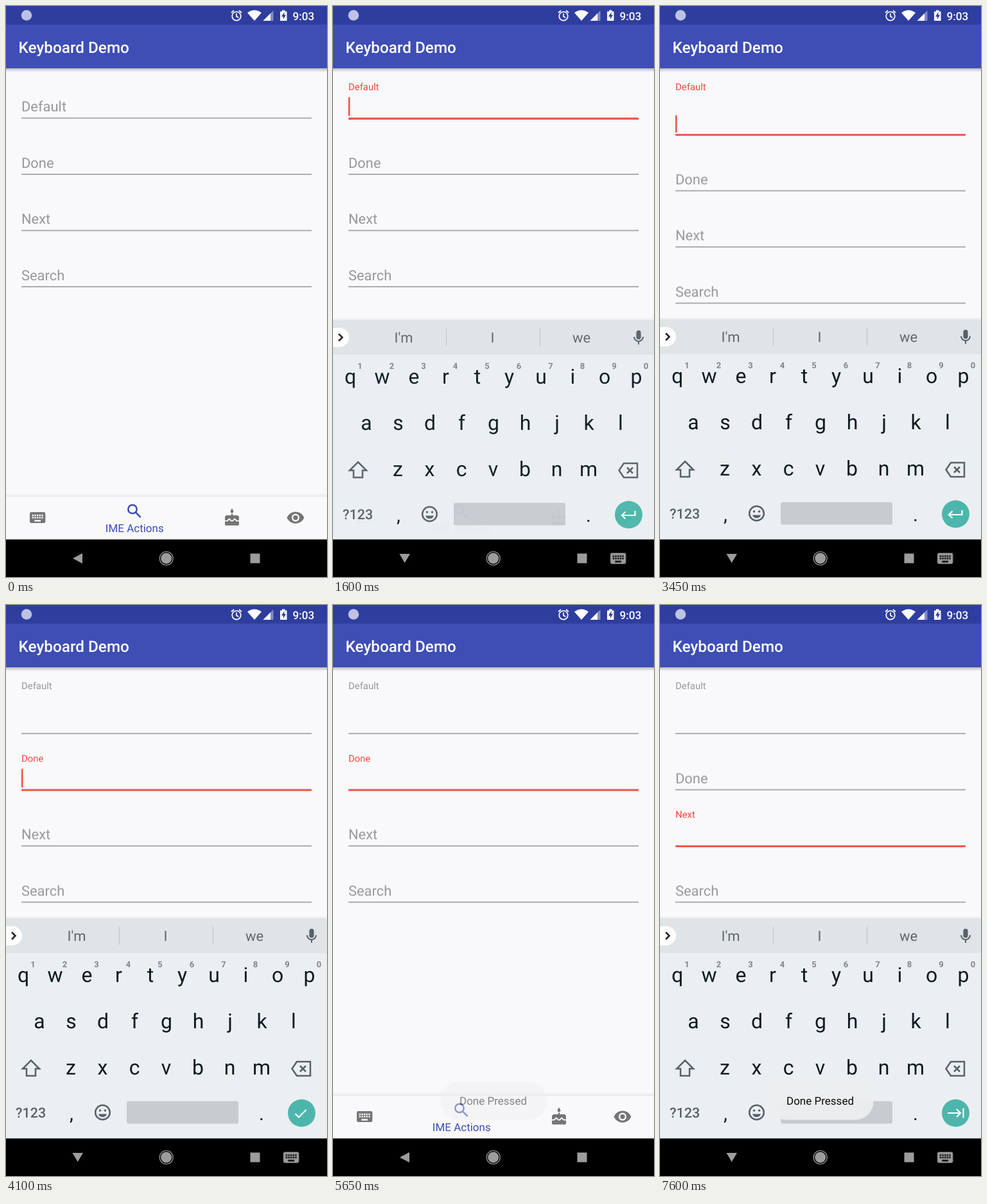
An HTML page for the animation above (8000 ms loop, 500x889 px).

```html
<!DOCTYPE html>
<html lang="en">
<head>
<meta charset="utf-8">
<title>Keyboard Demo</title>
<style>
:root { --bg: #f9f8fa; --grey: #999799; --red: #f2483f; --blue: #3d4db5; --ink: #566269; }
html, body { margin: 0; width: 100%; height: 100%; overflow: hidden; background: var(--bg); }
svg { display: block; width: 100vw; height: 100vh; font-family: Roboto, sans-serif; text-rendering: geometricPrecision; }
.mid { text-anchor: middle; }
.line { fill: none; stroke: var(--ink); stroke-width: 2.5; }
.white { stroke: #fff; stroke-width: 2.2; }

.step { animation: 8s step-end infinite; }
.ease { animation: 8s cubic-bezier(.4,0,.2,1) infinite; }
.label { font-size: 21.9px; fill: var(--grey); transform: translateY(-10.2px); }

/* 1% = 80 ms */
@keyframes grow { 0% { transform: none } 30.625% { transform: translateY(25.6px) } 100% { transform: translateY(25.6px) } }

@keyframes label0 {
  0%, 17.5% { transform: translateY(-10.2px) scale(1); fill: var(--grey) }
  20%, 48.125% { transform: translateY(-43.6px) scale(.68); fill: var(--red) }
  50.625%, 100% { transform: translateY(-43.6px) scale(.68); fill: var(--grey) }
}
@keyframes label1 {
  0%, 48.125% { transform: translateY(-10.2px) scale(1); fill: var(--grey) }
  50.625%, 88.75% { transform: translateY(-43.6px) scale(.68); fill: var(--red) }
  91.25%, 100% { transform: translateY(-10.2px) scale(1); fill: var(--grey) }
}
@keyframes label2 {
  0%, 88.75% { transform: translateY(-10.2px) scale(1); fill: var(--grey) }
  91.25%, 100% { transform: translateY(-43.6px) scale(.68); fill: var(--red) }
}

@keyframes focus0 { 0%, 48.125%, 100% { opacity: 0 } 17.5% { opacity: 1 } }
@keyframes focus1 { 0%, 88.75%, 100% { opacity: 0 } 48.125% { opacity: 1 } }
@keyframes focus2 { 0% { opacity: 0 } 88.75%, 100% { opacity: 1 } }

@keyframes caret0 { 0%, 23.75%, 30.625%, 100% { opacity: 0 } 17.5%, 30% { opacity: 1 } }
@keyframes caretB { 0%, 36.875%, 48.125%, 100% { opacity: 0 } 30.625%, 43.125% { opacity: 1 } }
@keyframes caret1 {
  0%, 54.375%, 66.875%, 80%, 88.75%, 100% { opacity: 0 }
  48.125%, 60.625%, 73.125%, 86.25% { opacity: 1 }
}
@keyframes caret2 { 0%, 95%, 100% { opacity: 0 } 88.75% { opacity: 1 } }

.board { animation: board 8s infinite; }
@keyframes board {
  0%, 17.5% { opacity: 0; transform: translateY(34px); animation-timing-function: cubic-bezier(.17,.84,.44,1) }
  21.25% { opacity: 1; transform: none }
  68.125% { opacity: 1; transform: none; animation-timing-function: cubic-bezier(.4,0,1,1) }
  70.5%, 88.75% { opacity: 0; transform: translateY(34px); animation-timing-function: cubic-bezier(.17,.84,.44,1) }
  92.5%, 100% { opacity: 1; transform: none }
}
@keyframes open { 0%, 69.375%, 100% { opacity: 0 } 18.125%, 89.375% { opacity: 1 } }
@keyframes shut { 0%, 69.375%, 100% { opacity: 1 } 18.125%, 89.375% { opacity: 0 } }

@keyframes enter { 0% { opacity: 1 } 48.125%, 100% { opacity: 0 } }
@keyframes check { 0%, 88.75%, 100% { opacity: 0 } 48.125% { opacity: 1 } }
@keyframes next { 0% { opacity: 0 } 88.75%, 100% { opacity: 1 } }

.press { animation: press 8s linear infinite; }
@keyframes press {
  0%, 29.37% { opacity: 0 }
  29.375%, 30.625% { opacity: 1 }
  32.5%, 66.87% { opacity: 0 }
  66.875%, 70% { opacity: 1 }
  71%, 100% { opacity: 0 }
}

@keyframes tap {
  0%, 17.5%, 30.625%, 48.75%, 68.125%, 89.375%, 100% { opacity: 0 }
  16.25% { opacity: 1; transform: translate(300px, 160px) }
  29.375% { opacity: 1; transform: translate(474px, 795px) }
  47.5% { opacity: 1; transform: translate(300px, 268px) }
  66.875% { opacity: 1; transform: translate(479px, 795px) }
  88.125% { opacity: 1; transform: translate(300px, 356px) }
}

.toast { animation: toast 8s infinite; }
@keyframes toast {
  0%, 69% { opacity: 0; animation-timing-function: cubic-bezier(.25,.46,.45,.94) }
  75%, 100% { opacity: 1 }
}
</style>
</head>
<body>
<svg viewBox="0 0 500 889" preserveAspectRatio="none">
  <defs>
    <linearGradient id="drop" x2="0" y2="1">
      <stop stop-color="#000" stop-opacity=".24"/><stop offset="1" stop-color="#000" stop-opacity="0"/>
    </linearGradient>
    <linearGradient id="rise" y1="1" x2="0" y2="0">
      <stop stop-color="#000" stop-opacity=".07"/><stop offset="1" stop-color="#000" stop-opacity="0"/>
    </linearGradient>
    <g id="keys">
      <rect x="2" y="5" width="20" height="14" rx="2"/>
      <path d="M5 9H19M5 12H19" stroke="var(--gap)" stroke-width="2" stroke-dasharray="2 1"/>
      <path d="M8 16H16" stroke="var(--gap)" stroke-width="2"/>
    </g>
  </defs>
  <rect width="500" height="889" fill="var(--bg)"/>

  <g id="form"><g id="flow" class="step" style="animation-name:grow"></g></g>

  <!-- tabs -->
  <rect y="759" width="500" height="5" fill="url(#rise)"/>
  <rect y="764" width="500" height="67" fill="var(--bg)"/>
  <g fill="#757575" style="--gap:var(--bg)">
    <use href="#keys" transform="translate(34.6 782) scale(1.2165)"/>
    <g transform="translate(337.4 782) scale(1.2165)">
      <path d="M12 0L13.7 3A2 2 0 1 1 10.3 3ZM3 12a3 3 0 0 1 3-3h5V7h2v2h5a3 3 0 0 1 3 3v9a1 1 0 0 1-1 1H4a1 1 0 0 1-1-1Z"/>
      <path d="M2 16.2H5q1 0 1.8-.8l1.7-1.8 2.3 2.2q1.2.9 2.4 0l2.3-2.2 1.7 1.8q.8.8 1.8.8h3" fill="none" stroke="var(--bg)" stroke-width="1.5"/>
    </g>
    <g transform="translate(436.4 782) scale(1.2165)">
      <path d="M1 12C2.7 7.6 7 4.5 12 4.5S21.3 7.6 23 12C21.3 16.4 17 19.5 12 19.5S2.700 16.4 1 12Z"/>
      <circle cx="12" cy="12" r="4" fill="none" stroke="var(--bg)" stroke-width="2"/>
    </g>
  </g>
  <g fill="none" stroke="var(--blue)" stroke-width="2.5">
    <circle cx="197" cy="783.4" r="6.7"/><path d="M201.800 788.200L209.600 796"/>
  </g>
  <text class="mid" x="200.300" y="819" font-size="17" fill="var(--blue)">IME Actions</text>

  <!-- soft keyboard -->
  <g class="board">
    <rect y="484" width="500" height="5" fill="url(#rise)"/>
    <rect y="488" width="500" height="380" fill="#eceff1"/>
    <rect y="488" width="500" height="54" fill="#e1e4e6"/>
    <path d="M0 500H10a15 15 0 0 1 0 30H0Z" fill="#fdfdfd"/>
    <path class="line" d="M9 509.500l5.500 5.500-5.500 5.500" style="stroke:#222"/>
    <path d="M176.500 501v28M322.500 501v28" stroke="#c3c7ca" stroke-width="1.200"/>
    <g class="mid" font-size="22" fill="#5d686e">
      <text x="110" y="523">I'm</text><text x="248.500" y="523">I</text><text x="387" y="523">we</text>
    </g>
    <rect x="472.400" y="504" width="7.200" height="14" rx="3.600" fill="var(--ink)"/>
    <path class="line" d="M469 514a7 7 0 0 0 14 0M476 521v5" style="stroke-width:2"/>
    <g id="letters" class="mid" fill="#0d1a20"></g>
    <text x="15" y="798" font-size="21.500" font-weight="500" fill="var(--ink)">?123</text>
    <path class="line" d="M39 709L52 722H46V733H32V722H26ZM453 711H474V733H453L445.500 722ZM458 717.500l9 9m0-9l-9 9"/>
    <circle class="line" cx="150.500" cy="790" r="11.300"/>
    <g fill="var(--ink)"><circle cx="146.500" cy="787" r="1.800"/><circle cx="154.500" cy="787" r="1.800"/>
      <path d="M144 792.500h13a6.800 6.800 0 0 1-13 0Z"/></g>
    <rect x="188" y="772.500" width="174" height="35" rx="3" fill="#c8ccd0"/>
    <circle cx="460.500" cy="791" r="21.500" fill="#4db6ac"/>
    <circle class="press" cx="460.500" cy="791" r="22" fill="#05a095"/>
    <path class="line white step" style="animation-name:enter" d="M470.500 785v7H450m5.500-5.500l-5.500 5.500 5.500 5.500"/>
    <path class="line white step" style="animation-name:check" d="M450.500 792l5.500 5.500 11.500-11.500"/>
    <path class="line white step" style="animation-name:next" d="M448 791h20m-6-6l6 6-6 6M472.500 783.500v15"/>
  </g>

  <!-- system bar -->
  <rect y="830.500" width="500" height="59" fill="#000"/>
  <g fill="#9c9c9c" style="--gap:#000">
    <path class="step" style="animation-name:shut" d="M104 860L119 852V868Z"/>
    <path class="step" style="animation-name:open" d="M103.500 853H120L111.700 867Z"/>
    <circle cx="249.700" cy="860" r="8.500"/>
    <circle cx="249.700" cy="860" r="10.500" fill="none" stroke="#9c9c9c" stroke-width="1.200"/>
    <rect x="380.500" y="852.500" width="15" height="15"/>
    <g class="step" style="animation-name:open"><use href="#keys" transform="translate(429.500 845.500) scale(1.2165)"/></g>
  </g>

  <g class="toast">
    <rect x="167.500" y="742" width="165" height="59.500" rx="28" fill="#eeeeef" fill-opacity=".95"/>
    <text class="mid" x="249.500" y="778" font-size="17" fill="#0c0c0c">Done Pressed</text>
  </g>

  <!-- top bars -->
  <rect y="97" width="500" height="6" fill="url(#drop)"/>
  <rect width="500" height="97" fill="#3f4eb5"/>
  <rect width="500" height="29" fill="#2f3e9e"/>
  <text x="19.500" y="73" font-size="24.300" font-weight="500" fill="#fff">Keyboard Demo</text>
  <circle cx="32" cy="14.500" r="8.300" fill="#bcc2e4"/>
  <g fill="#fff">
    <g fill="none" stroke="#fff" stroke-width="1.700">
      <circle cx="359" cy="15.800" r="6.800"/><path d="M359 11.500v4.800l3.300 2M351 10.500l4-3.500M367 10.500l-4-3.500"/>
    </g>
    <path d="M376 10.500Q387 2.500 398 10.500L387 23Z"/>
    <path d="M400.500 23L416.500 7V23Z" opacity=".4"/><path d="M400.500 23L412 11.500V23Z"/>
    <path d="M427 8.500h3v-2h4.500v2h3V23H427Z"/>
    <path d="M433.500 9.500l-4.500 7h2.800v4.500l4.200-7h-2.500Z" fill="#2f3e9e"/>
    <text x="446.500" y="21.500" font-size="17.200" font-weight="500">9:03</text>
  </g>

  <g class="step" style="animation-name:tap">
    <circle r="13" fill="#eef3fa" fill-opacity=".8" stroke="#a9b0e6" stroke-width="1.500"/>
  </g>
</svg>
<script>
const $ = id => document.getElementById(id);
const add = (id, markup) => $(id).insertAdjacentHTML('beforeend', markup);
const anim = name => `class="step" style="animation-name:${name}"`;
const caret = (name, y, h) => `<rect ${anim(name)} x="24" y="${y}" width="2.4" height="${h}" fill="var(--red)"/>`;

['Default', 'Done', 'Next', 'Search'].forEach((name, i) => {
  const y = 174.5 + 87.5 * i;
  const live = i < 3;
  // The first label stays put while its line moves down
  add(i ? 'flow' : 'form', `<g transform="translate(24 ${y})">
    <text class="label ease" style="animation-name:${live ? 'label' + i : 'none'}">${name}</text></g>`);
  add('flow', `<g transform="translate(0 ${y})">
    <rect x="24" y="-.6" width="452" height="1.3" fill="#858385"/>
    ${live ? `<rect ${anim('focus' + i)} x="24" y="-.6" width="452" height="2.5" fill="var(--red)"/>`
      + caret('caret' + i, -32.5, 29) : ''}
    ${i ? '' : caret('caretB', -30, 27)}</g>`);
});

const row = (chars, x, y, size, extra = '') => [...chars].forEach((c, i) =>
  add('letters', `<text x="${x + 49.5 * i}" y="${y}" font-size="${size}" ${extra}>${c}</text>`));
row('qwertyuiop', 27, 587, 32);
row('asdfghjkl', 52, 659, 32);
row('zxcvbnm', 101, 730.5, 32);
row('1234567890', 42, 563.5, 13, 'font-weight="700" fill="#7d868b"');
row(',', 102, 802, 30);
row('.', 398, 802, 30);
</script>
</body>
</html>
```
